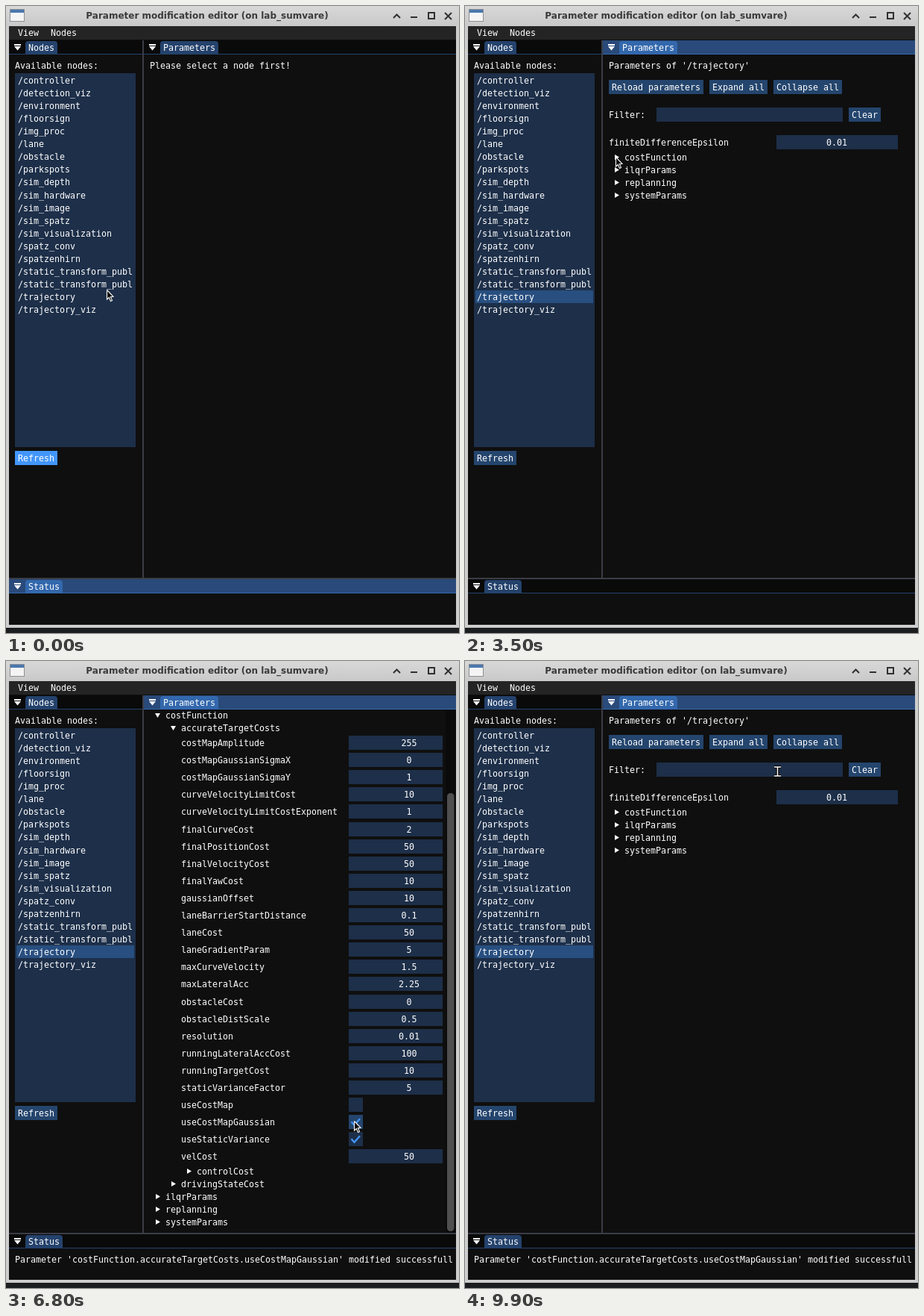
An HTML page with a canvas that plays this animation: 608x840 px, repeating every 10000 ms.

```html
<!DOCTYPE html>
<html lang="en">
<head>
<meta charset="utf-8">
<title>Parameter modification editor</title>
<style>
html, body { margin: 0; width: 100%; height: 100%; overflow: hidden; background: #1c1d1f; }
canvas { display: block; }
</style>
</head>
<body>
<canvas id="stage" width="608" height="840"></canvas>
<script>
const ctx = document.getElementById('stage').getContext('2d');
const LOOP = 10000, STEP = 100, HOVER_LAG = 200;
const MONO = '11.63px "DejaVu Sans Mono", monospace';
const BG = '#0f0f0f', FRAME = '#1d2f49', BUTTON = '#24456d', BRIGHT = '#4296fa';
const TAB = '#24426c', TAB_ACTIVE = '#3368ad', BAR_ACTIVE = '#294a7a', LINE = '#3b3d47';

const nodes = ['controller', 'detection_viz', 'environment', 'floorsign', 'img_proc', 'lane',
  'obstacle', 'parkspots', 'sim_depth', 'sim_hardware', 'sim_image', 'sim_spatz',
  'sim_visualization', 'spatz_conv', 'spatzenhirn', 'static_transform_publ',
  'static_transform_publ', 'trajectory', 'trajectory_viz'];
const SELECTED = nodes.indexOf('trajectory');

const costs = `costMapAmplitude 255,costMapGaussianSigmaX 0,costMapGaussianSigmaY 1,
curveVelocityLimitCost 10,curveVelocityLimitCostExponent 1,finalCurveCost 2,
finalPositionCost 50,finalVelocityCost 50,finalYawCost 10,gaussianOffset 10,
laneBarrierStartDistance 0.1,laneCost 50,laneGradientParam 5,maxCurveVelocity 1.5,
maxLateralAcc 2.25,obstacleCost 0,obstacleDistScale 0.5,resolution 0.01,
runningLateralAccCost 100,runningTargetCost 10,staticVarianceFactor 5,useCostMap off,
useCostMapGaussian off,useStaticVariance on,velCost 50`
  .split(',').map(item => item.trim().split(' '));

// Pointer way points: time, x, y
const path = [
  [-200, 40, 606], [0, 136, 381], [500, 100, 366], [1000, 80, 370], [1300, 77, 391],
  [1800, 76, 391], [2500, 243, 254], [2700, 253, 219], [3100, 203, 203], [3850, 203, 203],
  [4200, 225, 222], [4900, 225, 222], [5400, 434, 502], [5900, 468, 617], [7000, 468, 617],
  [7600, 467, 471], [7800, 467, 376], [8700, 460, 109], [9400, 460, 109], [9900, 419, 148]
];

function pointerAt(t) {
  const next = path.findIndex(p => p[0] >= t);
  if (next < 1) return path[0].slice(1);
  const [t0, x0, y0] = path[next - 1], [t1, x1, y1] = path[next];
  const u = (t - t0) / (t1 - t0), k = u * u * (3 - 2 * u);
  return [x0 + (x1 - x0) * k, y0 + (y1 - y0) * k];
}

let hover = [0, 0];
const inside = ([px, py], x, y, w, h) => px >= x && px < x + w && py >= y && py < y + h;

function rect(x, y, w, h, color) {
  ctx.fillStyle = color;
  ctx.fillRect(x, y, w, h);
}

function shape(color, ...points) {
  ctx.fillStyle = color;
  ctx.beginPath();
  points.forEach(([x, y]) => ctx.lineTo(x, y));
  ctx.closePath();
  ctx.fill();
}

function stroke(color, width, ...points) {
  ctx.strokeStyle = color;
  ctx.lineWidth = width;
  ctx.beginPath();
  points.forEach(([x, y]) => ctx.lineTo(x, y));
  ctx.stroke();
}

function text(str, x, middle, align = 'left') {
  ctx.font = MONO;
  ctx.textAlign = align;
  ctx.fillStyle = '#fff';
  ctx.fillText(str, x, Math.round(middle) + 4);
}

function clipped(x, y, w, h, draw) {
  ctx.save();
  ctx.beginPath();
  ctx.rect(x, y, w, h);
  ctx.clip();
  draw();
  ctx.restore();
}

// Framed widgets are 19 px high and start 10 px above the middle of their text.
function frame(x, middle, w, color, hoverColor = color) {
  const top = Math.round(middle - 10);
  rect(x, top, w, 19, inside(hover, x, top, w, 19) ? hoverColor : color);
}

function button(label, x, middle, w) {
  frame(x, middle, w, BUTTON, BRIGHT);
  text(label, x + 4, middle);
}

function dockBar(label, x, y, w, focused) {
  rect(x, y, w, 19, focused ? BAR_ACTIVE : '#0a0a0a');
  const color = focused ? TAB_ACTIVE : TAB;
  rect(x, y + 18, w, 1, color);
  ctx.fillStyle = color;
  ctx.beginPath();
  ctx.roundRect(x + 22, y + 1, label.length * 7 + 8, 18, [4, 4, 0, 0]);
  ctx.fill();
  rect(x + 7, y + 5, 9, 2, '#fff');
  shape('#fff', [x + 7, y + 8], [x + 16, y + 8], [x + 11.5, y + 13.5]);
  text(label, x + 26, y + 10);
}

function windowFrame() {
  rect(0, 0, 608, 840, '#1c1d1f');
  rect(0, 0, 608, 833, '#cdcdcd');
  const shade = ctx.createLinearGradient(0, 0, 0, 27);
  shade.addColorStop(0, '#d8d8d8');
  shade.addColorStop(1, '#c9c9c9');
  rect(0, 0, 608, 27, shade);
  rect(5, 4, 20, 17, '#8b8f94');
  rect(6, 5, 18, 15, '#f4f4f4');
  rect(6, 5, 18, 4, '#4a78b0');
  ctx.font = 'bold 12px "DejaVu Sans", sans-serif';
  ctx.textAlign = 'center';
  ctx.fillStyle = '#3a3a3a';
  ctx.fillText('Parameter modification editor (on lab_sumvare)', 270, 17);
  const ink = '#303030';
  stroke(ink, 2, [520, 16], [524.5, 11.5], [529, 16]);
  stroke(ink, 2, [543, 15], [552, 15]);
  ctx.strokeRect(567, 9, 8, 8);
  stroke(ink, 2, [589, 9], [598, 18]);
  stroke(ink, 2, [598, 9], [589, 18]);
  rect(4, 27, 600, 802, BG);
  rect(4, 27, 600, 18, '#242424');
  text('View', 16, 36);
  text('Nodes', 60, 36);
}

function nodePanel(selected, focused) {
  dockBar('Nodes', 4, 46, 179, focused);
  text('Available nodes:', 12, 80);
  rect(12, 90, 162, 501, FRAME);
  nodes.forEach((name, i) => {
    const y = 100 + i * 17.06, top = Math.round(y - 9);
    if (inside(hover, 14, top, 158, 17)) rect(14, top, 158, 17, '#3b81d7');
    else if (selected && i === SELECTED) rect(14, top, 158, 17, '#284f80');
    text('/' + name, 16, y);
  });
  button('Refresh', 12, 606, 57);
}

function treeRow(label, level, y, open) {
  const left = 210 + level * 4, top = y - 8;
  if (inside(hover, left, top, 390 - level * 8, 17))
    rect(left, top, 390 - level * 8, level ? 15 : 17, '#387bcb');
  const x = 200 + level * 21;
  if (open) shape('#fff', [x, y - 3], [x + 7, y - 3], [x + 3.5, y + 3]);
  else shape('#fff', [x + 1, y - 4], [x + 7, y - .5], [x + 1, y + 3]);
  text(label, x + 14, y);
}

function costRow(name, value, y) {
  const toggle = /^o[nf]/.test(value);
  text(name, 235, y);
  frame(460, y, toggle ? 19 : 126, FRAME, BUTTON);
  if (!toggle) text(value, 541, y, 'center');
  if (value === 'on') stroke(BRIGHT, 2.4, [463.5, y - 1], [467.5, y + 3.5], [475, y - 5]);
}

function parameters(t) {
  const expanded = t < 9400, open = t >= 3600 && expanded, details = t >= 4700 && expanded;
  const scroll = t < 5200 || t >= 7400 ? 0 : t < 5300 || t >= 7300 ? 65 : 130;
  let y = 80 - scroll;
  text("Parameters of '/trajectory'", 193, y);
  y += 29;
  button('Reload parameters', 193, y, 127);
  button('Expand all', 328, y, 78);
  button('Collapse all', 414, y, 92);
  y += 37;
  text('Filter:', 193, y);
  frame(257, y, 250, FRAME);
  button('Clear', 515, y, 43);
  y += 37;
  text('finiteDifferenceEpsilon', 193, y);
  frame(418, y, 163, FRAME, BUTTON);
  text('0.01', 499, y, 'center');
  y += 20;
  treeRow('costFunction', 0, y, open);
  if (open) {
    treeRow('accurateTargetCosts', 1, y += 17, details);
    if (details) {
      costs.forEach(([name, value], i) => {
        const changed = name === 'useCostMapGaussian' && t >= 6400;
        costRow(name, changed ? 'on' : value, y + 20 + i * 23.1);
      });
      treeRow('controlCost', 2, y += 594, false);
    }
    treeRow('drivingStateCost', 1, y += 17, false);
  }
  for (const name of ['ilqrParams', 'replanning', 'systemParams']) treeRow(name, 0, y += 17, false);
  if (details) {
    rect(590, 66, 14, 700, '#0a0a0a');
    ctx.fillStyle = '#4f4f4f';
    ctx.beginPath();
    ctx.roundRect(592, 68 + scroll * 109 / 130, 9.5, 587, 4.5);
    ctx.fill();
  }
}

function pointer([x, y]) {
  ctx.save();
  ctx.translate(Math.round(x), Math.round(y));
  if (inside([x, y], 257, 136, 250, 19)) {
    const bars = [[[-4, -6], [5, -6]], [[.5, -6], [.5, 6]], [[-4, 6], [5, 6]]];
    bars.forEach(bar => stroke('#000', 4, ...bar));
    bars.forEach(bar => stroke('#fff', 1.5, ...bar));
  } else {
    ctx.translate(-1, -1);
    const arrow = [[.5, .5], [.5, 13], [3.3, 10.5], [5.5, 15.5], [7.5, 14.6], [5.3, 9.8], [9, 9.4], [.5, .5]];
    shape('#000', ...arrow);
    stroke('#fff', 1.1, ...arrow);
  }
  ctx.restore();
}

function draw(now) {
  const t = Math.floor(now % LOOP / STEP) * STEP;
  const selected = t >= 1700;
  const focus = t < 1700 ? 'status' : t < 3500 ? 'nodes' : 'parameters';
  hover = pointerAt(t - HOVER_LAG);

  windowFrame();
  nodePanel(selected, focus === 'nodes');
  dockBar('Parameters', 185, 46, 419, focus === 'parameters');
  clipped(186, 66, 418, 700, () => {
    if (selected) parameters(t);
    else text('Please select a node first!', 193, 80);
  });
  rect(183, 46, 2, 721, LINE);
  rect(4, 766, 600, 2, LINE);
  dockBar('Status', 4, 768, 600, focus === 'status');
  if (t >= 6500) clipped(12, 790, 588, 30, () =>
    text("Parameter 'costFunction.accurateTargetCosts.useCostMapGaussian' modified successfully", 12, 802));
  pointer(pointerAt(t));
}

let start;
function tick(now) {
  start ??= now;
  draw(now - start);
  requestAnimationFrame(tick);
}
requestAnimationFrame(tick);
</script>
</body>
</html>
```
